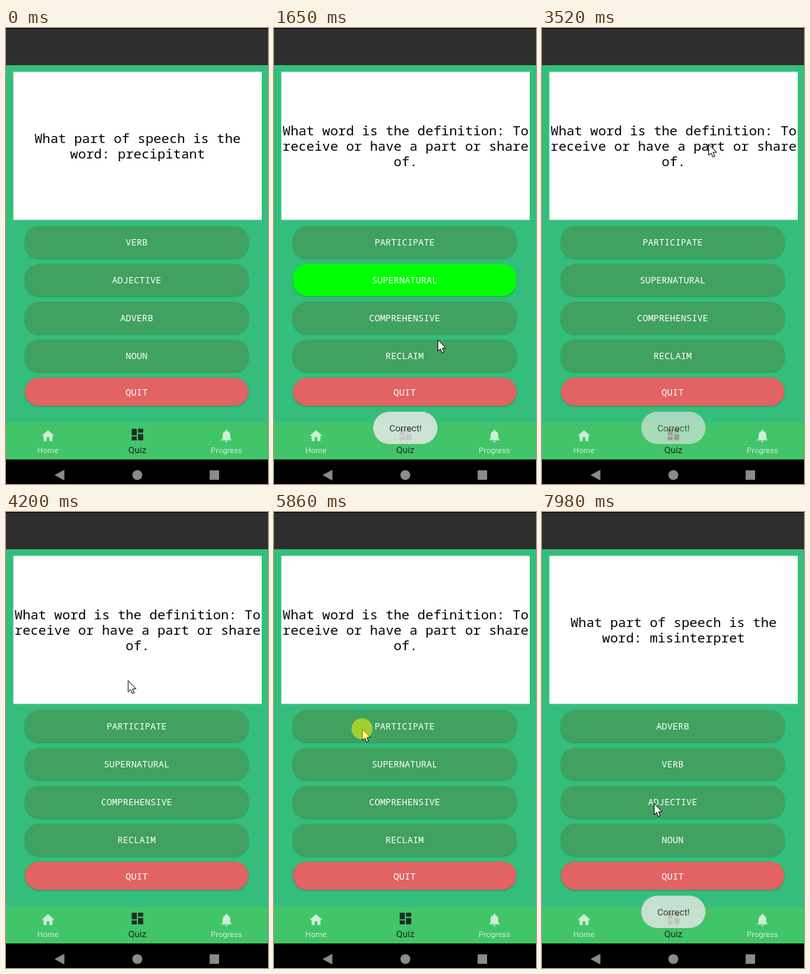
An HTML page for the animation above (8 s loop, 375 by 650 pixels).

```html
<!DOCTYPE html>
<html lang="en">
<head>
<meta charset="utf-8">
<title>Vocabulary quiz</title>
<style>
  html, body { margin: 0; width: 100%; height: 100%; overflow: hidden; background: #35be7b; }
  svg { display: block; width: 375px; height: 650px; }
  text { text-anchor: middle; white-space: pre; }
  .mono { font-family: "Noto Sans Mono", "DejaVu Sans Mono", monospace; }
  .question { font-size: 18.93px; font-weight: 500; }
  .label { font-size: 13.05px; fill: #fff; }
  .quit { font-size: 13.3px; font-weight: 500; }
  .button { filter: drop-shadow(0 1px 1px rgba(0, 0, 0, .25)); }
  .nav { font: 11.25px Roboto, sans-serif; fill: #cbeed6; }
  .active { font-size: 13.1px; fill: #1b2c22; }
  .toast { font: 13.2px Roboto, sans-serif; fill: #222; }
</style>
</head>
<body>
<svg viewBox="0 0 375 650">
  <rect width="375" height="650" fill="#35be7b"/>
  <rect width="375" height="53" fill="#2e2e2e"/>
  <rect width="375" height="1" fill="#000"/>
  <rect x="10.5" y="62.5" width="355.5" height="211" fill="#fff"/>
  <g id="question" class="mono question"></g>
  <g id="buttons"></g>
  <rect class="button" x="27" y="498.5" width="320" height="40" rx="20" fill="#e16364"/>
  <text class="mono label quit" x="187" y="523.5">QUIT</text>

  <rect y="563" width="375" height="52" fill="#42c468"/>
  <g class="nav">
    <path transform="translate(49.2 570.4) scale(.912)" d="M10 20v-6h4v6h5v-8h3L12 3 2 12h3v8z"/>
    <text x="60" y="606">Home</text>
    <path transform="translate(304.6 570.4) scale(.912)" d="M12 22c1.1 0 2-.9 2-2h-4c0 1.1.9 2 2 2zm6-6v-5c0-3.07-1.64-5.64-4.5-6.32V4c0-.83-.67-1.5-1.5-1.5s-1.5.67-1.5 1.5v.68C7.63 5.36 6 7.92 6 11v5l-2 2v1h16v-1z"/>
    <text x="315.5" y="606">Progress</text>
  </g>
  <g class="nav active">
    <path transform="translate(177.2 568.6) scale(.912)" d="M3 13h8V3H3zm0 8h8v-6H3zm10 0h8V11h-8zm0-18v6h8V3z"/>
    <text x="188" y="606">Quiz</text>
  </g>

  <rect y="615" width="375" height="35" fill="#000"/>
  <g fill="#8b8b8b">
    <path d="M69.5 637.3L83.5 629.8V645z"/>
    <circle cx="188" cy="637.3" r="7"/>
    <rect x="291.5" y="630.5" width="13.5" height="13.5"/>
  </g>

  <g id="toast">
    <rect x="142" y="547" width="92" height="46" rx="23" fill="#eaeaea"/>
    <text class="toast" x="188.2" y="575">Correct!</text>
  </g>
  <g id="cursor">
    <path d="M.5 .5V16.5L4.1 13.2 6.6 19 9.2 17.9 6.8 12.2H11.8z" fill="#fff" stroke="#000"/>
    <circle id="press" r="15" fill="#ff0" opacity=".5"/>
  </g>
</svg>
<script>
const LOOP = 8000;
const FADE = 500;
const $ = id => document.getElementById(id);

const screens = [
  { from: 0, lines: ['What part of speech is the', 'word: precipitant'],
    options: ['VERB', 'ADJECTIVE', 'ADVERB', 'NOUN'] },
  { from: 1390, lines: ['What word is the definition: To', 'receive or have a part or share', 'of.'],
    options: ['PARTICIPATE', 'SUPERNATURAL', 'COMPREHENSIVE', 'RECLAIM'], lit: 1, litUntil: 2280 },
  { from: 5890, lines: ['What part of speech is the', 'word: misinterpret'],
    options: ['ADVERB', 'VERB', 'ADJECTIVE', 'NOUN'], lit: 0, litUntil: 6780 }
];
const toasts = [[1390, 3170], [5890, 7715]];       // fade-in start, fade-out start
const presses = [[1200, 1370], [5710, 5880]];
const path = [                                     // time, x, y of the pointer tip
  [580, 319, 414], [700, 240, 382], [950, 160, 358],
  [1370, 160, 358], [1650, 234, 444], [1960, 256, 468], [2050, 257, 468],
  [3000, 257, 468], [3180, 292, 320], [3400, 250, 140], [3520, 238, 165], [3750, 240, 168],
  [3830, 236, 172], [4360, 148, 269], [4680, 148, 269], [5060, 158, 354],
  [5230, 158, 354], [5390, 131, 317], [5560, 126, 309],
  [6560, 126, 309], [6860, 150, 389], [7800, 150, 389], [7980, 160, 415]
];

$('buttons').innerHTML = [0, 1, 2, 3].map(i => `
  <rect class="button" x="27" y="${282.5 + 54 * i}" width="320" height="45.5" rx="20"/>
  <text class="mono label" x="187" y="${310.3 + 54 * i}"></text>`).join('');
const boxes = $('buttons').querySelectorAll('rect');
const labels = $('buttons').querySelectorAll('text');

const clamp = v => Math.max(0, Math.min(1, v));
const within = (t, [a, b]) => t >= a && t < b;

function pointerAt(t) {
  const i = path.findIndex(p => p[0] > t);
  if (i < 0) return path[path.length - 1].slice(1);
  const [t0, x0, y0] = path[i - 1], [t1, x1, y1] = path[i];
  const k = (t - t0) / (t1 - t0);
  return [x0 + (x1 - x0) * k, y0 + (y1 - y0) * k];
}

function toastAlpha(t) {
  const [start, end] = toasts[t < toasts[1][0] ? 0 : 1];
  const fadeIn = 1 - (1 - clamp((t - start) / FADE)) ** 3;
  const fadeOut = 1 - clamp((t - end) / FADE) ** 3;
  return .93 * fadeIn * fadeOut;
}

let shown;
function showScreen(screen) {
  if (screen === shown) return;
  shown = screen;
  const first = 175.5 - 11 * screen.lines.length - .1;
  $('question').innerHTML = screen.lines.map((line, i) =>
    `<text x="188.3" y="${first + 11 + 22 * i}">${line}</text>`).join('');
  screen.options.forEach((option, i) => labels[i].textContent = option);
}

function draw() {
  const t = performance.now() % LOOP;
  const screen = screens.filter(s => t >= s.from).pop();
  showScreen(screen);
  boxes.forEach((box, i) =>
    box.setAttribute('fill', i === screen.lit && t < screen.litUntil ? '#00ff00' : '#40a161'));
  $('toast').setAttribute('opacity', toastAlpha(t));

  const visible = t >= path[0][0];
  $('cursor').style.display = visible ? '' : 'none';
  if (visible) $('cursor').setAttribute('transform', `translate(${pointerAt(t)})`);
  $('press').style.display = presses.some(p => within(t, p)) ? '' : 'none';
  requestAnimationFrame(draw);
}
draw();
</script>
</body>
</html>
```
